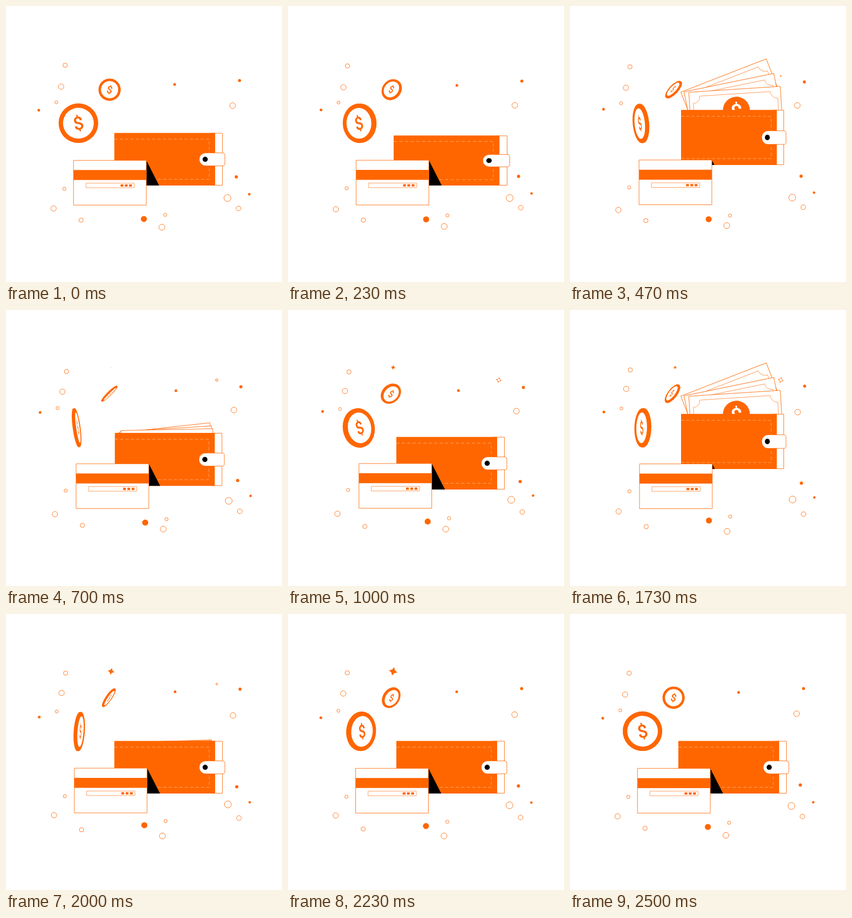
These frames come from a looping animation (512 by 512 pixels, 2530 ms). An HTML page with a canvas:

```html
<!DOCTYPE html>
<html lang="en">
<head>
<meta charset="utf-8">
<title>Wallet</title>
<style>
html, body { margin: 0; width: 100%; height: 100%; overflow: hidden; background: #fff; }
canvas { display: block; }
</style>
</head>
<body>
<canvas id="stage" width="512" height="512"></canvas>
<script>
const ctx = document.getElementById('stage').getContext('2d');
const LOOP = 2530, JUMP = LOOP / 2, TAU = Math.PI * 2;
const ORANGE = '#ff6600', PALE = '#ff8f45';

// x, y, radius (negative = filled); ordered so that each bobs a little after the last
const bubbles = [
  [291, 409, 5.5], [453, 347, -2.3], [110, 336.5, 3], [62.5, 190.5, -2.5],
  [412.5, 353.5, 6.4], [257.5, 393, -5.6], [297, 386, 3], [104, 149, 5],
  [90, 376, 5], [314.5, 147, -2.5], [111.5, 112, 4], [435, 141, -2.8],
  [95, 181.5, 2.8], [141, 400, 4], [422, 187, 5.3], [429, 318.5, -3], [433, 376, 4.4]
];
// top right corner and angle of each fanned-out note, back to front
const notes = [[364, 98, 21.3], [378, 125, 11.6], [390, 149, 3.7]];
// time and size
const solidStar = [[640, 0], [1400, 9], [1750, 3], [2200, 9], [2480, 0]];
const lineStar = [[300, 0], [950, 5], [1370, 2], [1750, 5], [2200, 0]];

const mix = (a, b, u) => a + (b - a) * u;
const smooth = u => u * u * (3 - 2 * u);
// cosine wave over one loop, highest at the given share of it
const swing = (t, peak) => Math.cos((t / LOOP - peak) * TAU);

function keyed(keys, t) {
  for (let i = 1; i < keys.length; i++) {
    const [t0, a] = keys[i - 1], [t1, b] = keys[i];
    if (t >= t0 && t < t1) return mix(a, b, (t - t0) / (t1 - t0));
  }
  return 0;
}

function placed(x, y, degrees, draw) {
  ctx.save();
  ctx.translate(x, y);
  ctx.rotate(degrees * Math.PI / 180);
  draw();
  ctx.restore();
}

function paint(fill, stroke) {
  if (fill) { ctx.fillStyle = fill; ctx.fill(); }
  if (stroke) { ctx.strokeStyle = stroke; ctx.lineWidth = .85; ctx.stroke(); }
}

function circle(x, y, r, fill, stroke, squeeze = 1) {
  ctx.beginPath();
  ctx.ellipse(x, y, r * squeeze, r, 0, 0, TAU);
  paint(fill, stroke);
}

function box(x, y, w, h, fill, stroke, radius = 0) {
  ctx.beginPath();
  ctx.roundRect(x, y, w, h, radius);
  paint(fill, stroke);
}

function dollar(size, color) {
  ctx.font = `500 ${size}px Roboto, sans-serif`;
  ctx.textAlign = 'center';
  ctx.fillStyle = color;
  ctx.fillText('$', 0, size * .355);
}

function drawStar(x, y, r, fill, stroke) {
  if (r <= 0) return;
  placed(x, y, 14, () => {
    ctx.beginPath();
    for (let i = 0; i < 8; i++) {
      const a = i * TAU / 8, d = i % 2 ? r * .48 : r;
      ctx.lineTo(Math.cos(a) * d, Math.sin(a) * d);
    }
    ctx.closePath();
    paint(fill, stroke);
  });
}

// lift 0..1, squash 1 (flat) to -1 (stretched), fan 0..1
function jumpPose(p) {
  if (p < 233) return { lift: 0, squash: smooth(p / 233), fan: 0 };
  if (p < 470) {
    const u = (p - 233) / 237, lift = u * (2 - u);
    return { lift, squash: 1 - 2 * lift, fan: lift };
  }
  const fall = span => Math.max(0, 1 - ((p - 470) / span) ** 1.4);
  const lift = fall(265);
  return { lift, squash: -lift, fan: fall(275) };
}

function drawNote([x, y, angle], fan, front) {
  placed(mix(382, x, fan), mix(240, y, fan), -angle * fan ** .8, () => {
    box(-170, 0, 170, 75, '#fff', ORANGE);
    const left = -163, right = -6, top = 8.5, bottom = 66.5, notch = 13;
    ctx.beginPath();
    ctx.arc(left, top, notch, TAU / 4, 0, true);
    ctx.arc(right, top, notch, TAU / 2, TAU / 4, true);
    ctx.arc(right, bottom, notch, -TAU / 4, TAU / 2, true);
    ctx.arc(left, bottom, notch, 0, -TAU / 4, true);
    ctx.closePath();
    paint(null, PALE);
    if (!front) return;
    circle(-84, 39, 25, ORANGE);
    ctx.translate(-84, 42);
    dollar(40, '#fff');
  });
}

function drawWallet(bottom, squash) {
  ctx.save();
  ctx.translate(301.5, bottom);
  ctx.scale(1 + .05 * squash, 1 - .05 * squash);
  ctx.translate(-301.5, -333);
  box(380, 236, 21.5, 96.5, '#fff', ORANGE);
  box(201, 235.5, 187, 97.5, ORANGE);
  ctx.beginPath();
  ctx.moveTo(201, 247);
  ctx.lineTo(377, 247);
  ctx.lineTo(377, 321.5);
  ctx.lineTo(201, 321.5);
  ctx.setLineDash([6, 4]);
  paint(null, '#ffb27f');
  ctx.setLineDash([]);
  box(358.5, 272.5, 47.5, 24, '#fff', ORANGE, [12, 4, 4, 12]);
  circle(369.5, 284.3, 4.8, '#000');
  ctx.restore();
}

function drawCard(t, walletBottom) {
  const s = swing(t, .455), x = 128.5 + 3.4 * s, y = 285.6 - .8 * s;
  const right = x + 135, drop = walletBottom - y;
  ctx.beginPath();
  ctx.moveTo(right, y);
  ctx.lineTo(right, walletBottom);
  ctx.lineTo(right + drop * .51, walletBottom);
  paint('#000');
  box(x, y, 135, 83, '#fff', ORANGE);
  box(x, y + 18, 135, 18.5, ORANGE);
  box(x + 23, y + 42.3, 89.5, 8.5, '#fff', PALE);
  for (let i = 0; i < 3; i++) box(x + 87.3 + i * 7.9, y + 44.5, 5.2, 4.2, ORANGE);
}

function drawCoin(t, x, y, tilt, r, glyphTilt) {
  const turn = t / LOOP * TAU, c = Math.cos(turn);
  const width = Math.abs(c), depth = Math.sin(turn) * Math.sign(c), edge = Math.abs(depth);
  placed(x, y, tilt, () => {
    ctx.scale(r, r);
    circle(-.03 * edge, 0, 1, ORANGE, null, width);
    circle(.03 * edge, 0, 1, ORANGE, null, width);
    ctx.translate(-.066 * depth, 0);
    ctx.scale(Math.max(width - .06 * edge, .01), 1);
    circle(0, 0, .78, '#fff');
    ctx.rotate(glyphTilt * Math.PI / 180);
    ctx.scale(1 / 36, 1 / 36);
    dollar(33, ORANGE);
  });
}

function drawBubbles(t) {
  const drift = 1.8 * swing(t, .46);
  bubbles.forEach(([x, y, r], i) => {
    const bob = 2.8 * swing(t, i / 18 - 1 / 6);
    circle(x + drift, y + bob, Math.abs(r), r < 0 ? ORANGE : '#fff', r > 0 && ORANGE);
  });
}

function draw(t) {
  const { lift, squash, fan } = jumpPose(t % JUMP);
  const bottom = 333 - 38 * lift, sway = swing(t, .85);
  ctx.fillStyle = '#fff';
  ctx.fillRect(0, 0, 512, 512);
  drawBubbles(t);
  drawStar(195, 106.5, keyed(solidStar, t), ORANGE);
  drawStar(391, 130, keyed(lineStar, t), '#fff', ORANGE);
  if (fan > 0) notes.forEach((note, i) => drawNote(note, fan, i === 2));
  drawWallet(bottom, squash);
  drawCard(t, bottom);
  drawCoin(t, 133.4 + 2.5 * swing(t, .81), 218.2 - .8 * swing(t, 0), 6.5 * sway - 2, 36.6, -15);
  drawCoin(t, 191.2 + 1.2 * swing(t, .1), 155.2, 40 - 6 * sway, 20.5, -23);
}

function tick() {
  draw(performance.now() % LOOP);
  requestAnimationFrame(tick);
}
tick();
</script>
</body>
</html>
```
